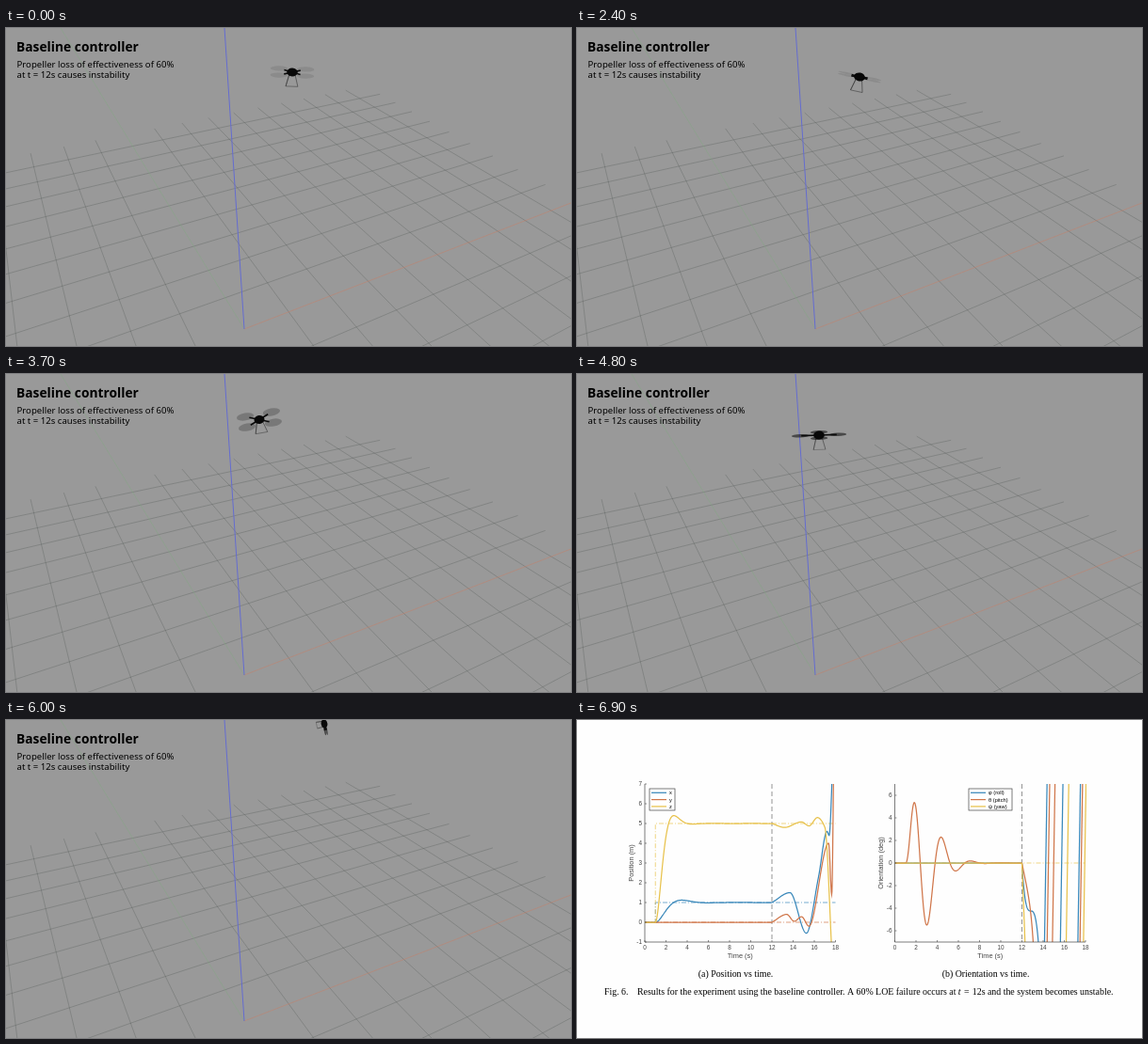
These frames come from a looping animation (600x338 px, 8000 ms). An HTML page with a canvas:

```html
<!DOCTYPE html>
<html lang="en">
<head>
<meta charset="utf-8">
<title>Baseline controller</title>
<style>
html, body { margin: 0; width: 100%; height: 100%; overflow: hidden; background: #999; }
canvas { display: block; width: 100vw; height: 100vh; }
</style>
</head>
<body>
<canvas id="stage" width="600" height="338"></canvas>
<script>
const ctx = document.getElementById('stage').getContext('2d');
const LOOP = 8000, CHART_START = 6900;
const SANS = '"Noto Sans", "Open Sans", sans-serif';
const PLOT = '"Liberation Sans", Arial, sans-serif';
const SERIF = '"Liberation Serif", "Times New Roman", serif';
const BLUE = '#3a88ba', RED = '#d0764a', YELLOW = '#e8c24c';

function line(points, color, width = 1, dash = []) {
  ctx.beginPath();
  points.forEach(([x, y]) => ctx.lineTo(x, y));
  ctx.strokeStyle = color;
  ctx.lineWidth = width;
  ctx.setLineDash(dash);
  ctx.stroke();
  ctx.setLineDash([]);
}

function text(str, x, y, font, align = 'left', color = '#000') {
  ctx.font = font;
  ctx.textAlign = align;
  ctx.fillStyle = color;
  ctx.fillText(str, x, y);
}

const clamp01 = v => Math.min(1, Math.max(0, v));
const ease = v => { const s = clamp01(v); return s * s * (3 - 2 * s); };

// Monotone cubic through rows [t, ...values]; reads one column, held at both ends.
function spline(rows, t, column = 1) {
  let i = 0;
  while (i < rows.length - 2 && rows[i + 1][0] < t) i++;
  const slope = k => rows[k] && rows[k + 1]
    ? (rows[k + 1][column] - rows[k][column]) / (rows[k + 1][0] - rows[k][0]) : null;
  const tangent = k => {
    const a = slope(k - 1) ?? slope(k), b = slope(k) ?? a;
    return a * b > 0 ? 2 * a * b / (a + b) : 0;
  };
  const h = rows[i + 1][0] - rows[i][0], s = clamp01((t - rows[i][0]) / h);
  return rows[i][column] + (rows[i + 1][column] - rows[i][column]) * ease(s)
    + h * s * (1 - s) * ((1 - s) * tangent(i) - s * tangent(i + 1));
}

// Ground coordinates (10 m units) to the screen.
function ground(x, y) {
  const w = 1 + 0.3938 * x + 0.7247 * y;
  return [(253 + 590.2 * x - 34 * y) / w, (320 - 63.5 * x - 125.1 * y) / w];
}

function drawWorld() {
  ctx.fillStyle = '#999';
  ctx.fillRect(0, 0, 600, 338);
  const gridColor = 'rgba(75,80,76,.42)';
  for (let i = -5; i < 10; i++) {
    if (i === 0) continue;
    line([ground(i / 10, -0.45), ground(i / 10, 1)], gridColor, 0.7);
    line([ground(-0.5, i / 10), ground(1, i / 10)], gridColor, 0.7);
  }
  line([[253, 320], ground(1.2, 0)], 'rgba(200,125,100,.6)', 0.8);
  line([[253, 320], [58, 0]], 'rgba(125,170,125,.5)', 0.8);
  line([[253, 320], [232, 0]], '#646cd0', 1);
}

// Flight key points: time, x, y, roll (deg), rotor plane openness (0 edge-on, 1 face-on)
const FLIGHT = [
  [1200, 304, 47, 2, .25],
  [2400, 300, 52, 12, .08],
  [3000, 321, 55, 0, .3],
  [3300, 307, 78, -5, .3],
  [3700, 269, 48.5, -10, .4],
  [4300, 202, 75, 0, .3],
  [4800, 257, 65, -2, .16],
  [5400, 313, 45, 40, .3],
  [6000, 338, 4, 78, .12],
  [6600, 370, 104, 5, .9],
  [6700, 422.5, 148.5, 0, 1],
  [6800, 475, 193, 0, 1]
];

function drawDrone(t) {
  const [x, y, rollDegrees, open] = [1, 2, 3, 4].map(column => spline(FLIGHT, t, column));
  const roll = rollDegrees * Math.PI / 180;
  const yaw = Math.PI / 4 * (1 - Math.exp(-(((t - 4800) / 400) ** 2)));
  const arm = 20 - 9.4 * ease((t - 4800) / 1200);
  const alpha = 0.1 + 0.5 * clamp01((t - 2400) / 2400) ** 2;
  const reach = 0.55 + 0.65 * alpha;
  const size = 2 + arm / 8;
  const legs = 0.78 * arm * Math.sqrt(1 - open * open);

  ctx.save();
  ctx.translate(x, y);
  ctx.rotate(roll);

  if (legs > 1) {
    const half = arm * 0.32;
    line([[-3, 2], [-half, legs], [half, legs]], `rgba(50,50,50,${0.75 - alpha / 2})`, 0.7);
    line([[-3, 2], [-half, legs]], 'rgba(50,50,50,.7)', 0.8);
    line([[3, 2], [half, legs]], 'rgba(50,50,50,.7)', 0.8);
  }

  for (let k = 0; k < 4; k++) {
    const angle = yaw + k * Math.PI / 2;
    const px = arm * Math.cos(angle), py = arm * open * Math.sin(angle);
    ctx.fillStyle = `rgba(20,20,20,${alpha})`;
    ctx.beginPath();
    ctx.ellipse(px, py, arm * 0.46, arm * open * 0.46 + 0.3, 0, 0, 7);
    ctx.fill();
    line([[0, 0], [px * reach, py * reach]], '#0c0c0c', 1.7);
  }

  ctx.fillStyle = '#080808';
  ctx.beginPath();
  ctx.ellipse(0, 0, size * (1.35 - 0.3 * open), size, 0, 0, 7);
  ctx.fill();
  ctx.restore();
}

function drawTitle() {
  text('Baseline controller', 11, 25, `bold 13.8px ${SANS}`);
  text('Propeller loss of effectiveness of 60%', 11.5, 42, `9.6px ${SANS}`);
  text('at t = 12s causes instability', 11.5, 53.3, `9.6px ${SANS}`);
}

const FAILURE = 12;

// Underdamped answer to a unit step at t = 1.
function stepResponse(t, decay, omega) {
  const s = Math.max(0, t - 1);
  return 1 - Math.exp(-decay * s) * (Math.cos(omega * s) + decay / omega * Math.sin(omega * s));
}

function pitchSwing(t) {
  const s = Math.max(0, t - 1);
  return 22 * s ** 1.7 * Math.exp(-1.27 * s) * Math.sin(2.24 * s);
}

const failing = (before, after) => t => t < FAILURE ? before(t) : after(t);
const through = keys => t => spline(keys, t);

const POSITION = {
  left: 72, min: -1, max: 7, firstTick: -1, tickStep: 1, label: 'Position (m)', labelX: 60,
  caption: '(a) Position vs time.', captionX: 168.5,
  legend: { x: 77, w: 27, names: ['x', 'y', 'z'] },
  refs: [[BLUE, 1], [RED, 0], [YELLOW, 5]],
  curves: [
    [BLUE, failing(t => stepResponse(t, 0.85, 1.26),
      through([[12, 1], [13.7, 1.5], [15.25, -.55], [16.4, 2.3], [17.2, 4.6], [17.4, 4.4], [17.8, 9]]))],
    [RED, failing(() => 0,
      through([[12, 0], [13.4, .4], [14.1, .05], [14.8, .28], [15.5, -.2], [17.35, 4], [17.65, 1.4], [17.85, 9]]))],
    [YELLOW, failing(t => 5 * stepResponse(t, 1.45, 1.8),
      through([[12, 5], [13.2, 4.8], [14.8, 5.08], [15.5, 4.88], [16.3, 5.3], [17, 4.8], [17.7, -2]]))]
  ],
  swings: []
};

const ORIENTATION = {
  left: 337.5, min: -7, max: 7, firstTick: -6, tickStep: 2, label: 'Orientation (deg)', labelX: 325,
  caption: '(b) Orientation vs time.', captionX: 434,
  legend: { x: 416, w: 46, names: ['φ (roll)', 'θ (pitch)', 'ψ (yaw)'] },
  refs: [[YELLOW, 0]],
  curves: [
    [BLUE, failing(() => 0, t => -4.25 - 7.4 * (t - FAILURE - 0.83) ** 3)],
    [RED, failing(pitchSwing, t => -4.6 * (t - FAILURE) - 1.6 * (t - FAILURE) ** 5)],
    [YELLOW, failing(() => 0, t => -24 * (t - FAILURE))]
  ],
  // Times at which each angle sweeps across the whole range.
  swings: [[BLUE, [14.25, 15.75, 17.4]], [RED, [14.5, 15, 17.6]], [YELLOW, [16.3, 17.93]]]
};

function drawPlot(plot) {
  const top = 68, bottom = 236, width = 202.5, ink = '#444';
  const px = t => plot.left + t / 18 * width;
  const py = v => bottom - (v - plot.min) / (plot.max - plot.min) * (bottom - top);
  const sample = f => Array.from({ length: 601 }, (_, i) => [px(i * 0.03), py(f(i * 0.03))]);

  ctx.save();
  ctx.beginPath();
  ctx.rect(plot.left, top, width + 1, bottom - top);
  ctx.clip();
  for (const [color, v] of plot.refs) {
    line([[px(0), py(0)], [px(1), py(0)], [px(1), py(v)], [px(18), py(v)]], color, 0.7, [5, 2, 1, 2]);
  }
  line([[px(FAILURE), top], [px(FAILURE), bottom]], '#888', 0.9, [5, 3]);
  for (const [color, f] of plot.curves) line(sample(f), color, 1.25);
  for (const [color, times] of plot.swings) {
    for (const t of times) line([[px(t - 0.12), bottom], [px(t + 0.12), top]], color, 1.25);
  }
  ctx.restore();

  line([[plot.left, top], [plot.left, bottom], [plot.left + width, bottom]], ink, 0.7);
  for (let t = 0; t <= 18; t += 2) {
    line([[px(t), bottom], [px(t), bottom - 2]], ink, 0.6);
    text(t, px(t), 244, `6.4px ${PLOT}`, 'center', ink);
  }
  for (let v = plot.firstTick; v <= plot.max; v += plot.tickStep) {
    line([[plot.left, py(v)], [plot.left + 2, py(v)]], ink, 0.6);
    text(v, plot.left - 3, py(v) + 2.2, `6.4px ${PLOT}`, 'right', ink);
  }
  text('Time (s)', plot.left + width / 2, 253, `7.4px ${PLOT}`, 'center', ink);
  ctx.save();
  ctx.translate(plot.labelX, (top + bottom) / 2);
  ctx.rotate(-Math.PI / 2);
  text(plot.label, 0, 0, `7.4px ${PLOT}`, 'center', ink);
  ctx.restore();

  const { x, w, names } = plot.legend;
  ctx.fillStyle = '#fff';
  ctx.fillRect(x, 73, w, 23);
  ctx.lineWidth = 0.7;
  ctx.strokeStyle = ink;
  ctx.strokeRect(x, 73, w, 23);
  names.forEach((name, i) => {
    const y = 77.3 + i * 7.3;
    line([[x + 2, y], [x + 18, y]], [BLUE, RED, YELLOW][i], 1.25);
    text(name, x + 21, y + 1.9, `5.7px ${PLOT}`);
  });
  text(plot.caption, plot.captionX, 273, `9.9px ${SERIF}`, 'center');
}

function drawCharts() {
  ctx.fillStyle = '#fefefe';
  ctx.fillRect(0, 0, 600, 338);
  drawPlot(POSITION);
  drawPlot(ORIENTATION);
  const font = `9.9px ${SERIF}`;
  text('Fig. 6.', 29, 291.5, font);
  let x = 64;
  for (const [part, style] of [
    ['Results for the experiment using the baseline controller. A 60% LOE failure occurs at ', ''],
    ['t', 'italic '],
    ['\u2004=\u200412s and the system becomes unstable.', '']
  ]) {
    text(part, x, 291.5, style + font);
    x += ctx.measureText(part).width;
  }
}

function frame() {
  const t = Math.floor(performance.now() % LOOP / 100) * 100;
  if (t >= CHART_START) {
    drawCharts();
  } else {
    drawWorld();
    drawDrone(t);
    drawTitle();
  }
  requestAnimationFrame(frame);
}
frame();
</script>
</body>
</html>
```
